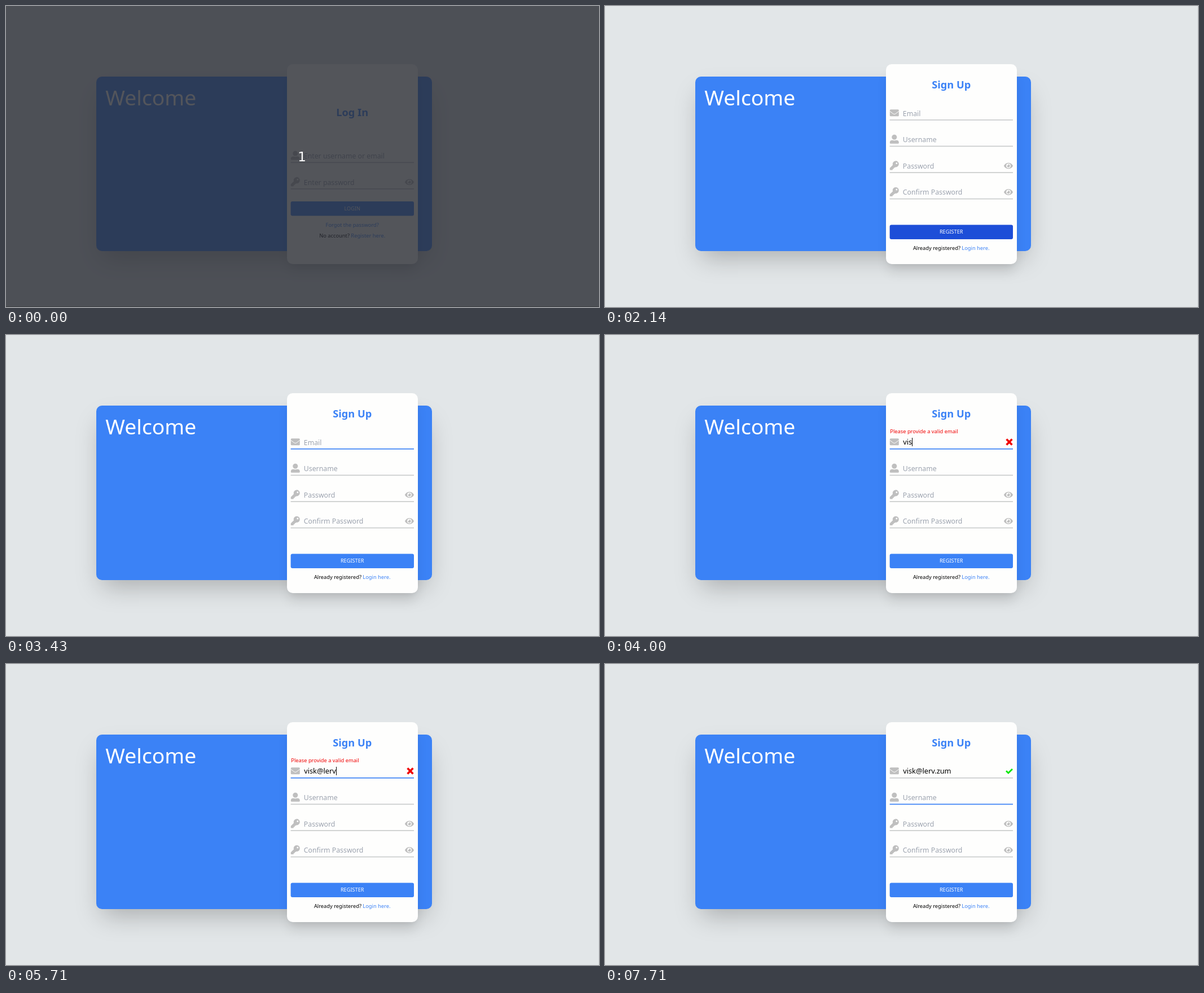
An HTML page that plays this animation: 1051x533 px, repeating every 8 s.

```html
<!DOCTYPE html>
<html lang="en">
<head>
<meta charset="utf-8">
<title>Welcome</title>
<style>
  html, body { margin: 0; width: 100%; height: 100%; overflow: hidden; }
  body { position: relative; background: #e2e6e8; }
  .panel, .card, svg { position: absolute; }
  .panel {
    left: 160px; top: 125.4px; width: 595px; height: 308.6px;
    border-radius: 10px; background: #3b82f6;
    box-shadow: 0 21px 42px -10px rgba(0, 0, 0, .25);
  }
  .card {
    left: 498.2px; top: 103px; width: 231.4px; height: 354px;
    border-radius: 10px; background: #fefefd;
    box-shadow: 0 17px 21px -4px rgba(0, 0, 0, .1), 0 8px 8px -4px rgba(0, 0, 0, .04);
  }
  svg { left: 0; top: 0; }
  text { font-family: "Noto Sans", "Open Sans", sans-serif; white-space: pre; }
  .welcome { font-size: 37.3px; fill: #fff; }
  .title { font-size: 18.2px; font-weight: 700; }
  .title, .small, .label { text-anchor: middle; }
  .title, .link { fill: #3b82f6; }
  .small, .error { font-size: 9.3px; }
  .label { font-size: 9.2px; fill: #fff; }
  .hint { font-size: 12.3px; fill: #9ca3af; }
  .value { font-size: 12.8px; fill: #000; }
  .error { fill: #f00000; }
  .icon { fill: #bfbfbf; fill-rule: evenodd; }
  .line { fill: #cacccd; }
  .line.focus, .button { fill: #3b82f6; }
  .button.hover { fill: #1d4ed8; }
  .mark { fill: none; }
  .count { font: 23px "DejaVu Sans", sans-serif; fill: #fff; text-anchor: middle; }
</style>
</head>
<body>
<div class="panel"></div>
<div class="card"></div>
<svg width="1051" height="533" viewBox="0 0 1051 533">
  <defs>
    <g id="user">
      <circle cx="8" cy="4.5" r="4.5"/>
      <path d="M12 10h-1.7a5.4 5.4 0 0 1-4.6 0H4a4 4 0 0 0-4 4v.5A1.5 1.5 0 0 0 1.5 16h13a1.5 1.5 0 0 0 1.5-1.5V14a4 4 0 0 0-4-4z"/>
    </g>
    <g id="mail">
      <rect y="2" width="16" height="12" rx="1.5"/>
      <path d="M0 5.2L6 9.7Q8 11.2 10 9.7L16 5.2" fill="none" stroke="#fefefd"/>
    </g>
    <path id="key" d="M16 5.5A5.5 5.5 0 0 1 9.5 10.9L8.7 11.75A.75.75 0 0 1 8.2 12H7v1.25a.75.75 0 0 1-.75.75H5v1.25a.75.75 0 0 1-.75.75H.75A.75.75 0 0 1 0 15.25v-2.4q0-.35.2-.55l5.1-5.1A5.5 5.5 0 1 1 16 5.5zM10.5 4a1.5 1.5 0 1 0 3 0 1.5 1.5 0 1 0-3 0z"/>
    <path id="eye" d="M.1-.4C1.6-3.3 4.6-5.3 8-5.3s6.4 2 7.9 4.9a.9.9 0 0 1 0 .8C14.4 3.3 11.4 5.3 8 5.3S1.6 3.3 .1 .4a.9.9 0 0 1 0-.8zM8 4a4 4 0 1 0 0-8 4 4 0 0 0 0 8zM7.3-2.55a1.33 1.33 0 0 1-1.86 1.86A2.66 2.66 0 1 0 7.3-2.55z"/>
  </defs>
  <rect x="1050" width="1" height="533" fill="#d9dddf"/>
  <text class="welcome" x="176.3" y="176">Welcome</text>

  <g id="login">
    <text class="title" x="613.7" y="195">Log In</text>
    <g class="rows"></g>
    <rect class="button" x="504.6" y="346" width="218.4" height="25.4" rx="3"/>
    <text class="label" x="613.7" y="361.5">LOGIN</text>
    <text class="small link" x="613.7" y="390.6">Forgot the password?</text>
    <text class="small" x="613.7" y="410">No account? <tspan class="link">Register here.</tspan></text>
  </g>

  <g id="signup">
    <text class="title" x="613.7" y="146.3">Sign Up</text>
    <g class="rows"></g>
    <rect id="register" class="button" x="504.6" y="387.6" width="218.4" height="25.4" rx="3"/>
    <text class="label" x="613.7" y="403.3">REGISTER</text>
    <text class="small" x="613.7" y="432.4">Already registered? <tspan class="link">Login here.</tspan></text>
    <text id="error" class="error" x="505.3" y="174">Please provide a valid email</text>
    <text id="value" class="value" x="528.2" y="194.4"></text>
    <path id="cross" class="mark" stroke="#f00000" stroke-width="3.6" d="M711.6 184.6l9.8 9.8M721.4 184.6l-9.8 9.8"/>
    <path id="check" class="mark" stroke="#0ce80c" stroke-width="2.8" d="M711 189.2l3.9 3.9 7.1-7.1"/>
    <rect id="caret" width="1" height="15"/>
  </g>

  <g id="cover">
    <rect width="1051" height="533" fill="rgba(40,43,50,.8)"/>
    <rect y="532" width="1051" height="1" fill="#3c3f42"/>
    <text class="count" x="524.6" y="275">1</text>
  </g>
</svg>
<script>
const $ = id => document.getElementById(id);
const LOOP = 8000;
const ADDRESS = 'visk@lerv.zum';

const row = (y, icon, hint, eye) => `
  <use class="icon" href="#${icon}" x="504.8" y="${y - 20.6}"/>
  <text class="hint" x="527.8" y="${y - 7.2}">${hint}</text>
  ${eye ? `<use class="icon" href="#eye" x="707" y="${y - 12}"/>` : ''}
  <rect class="line" x="504.6" y="${y - .9}" width="218.4" height="1.7"/>`;

const fill = (id, first, rows) => {
  document.querySelector(`#${id} .rows`).innerHTML =
    rows.map((r, i) => row(first + i * 46.6, ...r)).join('');
};
fill('login', 277.2, [
  ['user', 'Enter username or email'],
  ['key', 'Enter password', true]
]);
fill('signup', 201.8, [
  ['mail', 'Email'],
  ['user', 'Username'],
  ['key', 'Password', true],
  ['key', 'Confirm Password', true]
]);

const lines = document.querySelectorAll('#signup .line');
const emailHint = document.querySelector('#signup .hint');

// [time, characters typed]
const typing = [[3860, 2], [4000, 3], [4290, 4], [4570, 5], [5430, 7],
  [5570, 8], [5710, 9], [6430, 10], [6570, 12], [6710, 13]];
const caretOn = [[3000, 3430], [3860, 5140], [5430, 6290], [6430, 7570]];

const show = (el, on) => { el.style.display = on ? '' : 'none'; };

function render(t) {
  const within = (a, b = LOOP) => t >= a && t < b;
  show($('cover'), within(0, 140));
  show($('login'), within(0, 2140));
  show($('signup'), within(2140));
  $('register').classList.toggle('hover', within(2140, 2570));
  lines[0].classList.toggle('focus', within(3000, 7000));
  lines[1].classList.toggle('focus', within(7000));

  const count = typing.reduce((n, [at, c]) => t >= at ? c : n, 0);
  const value = $('value');
  value.textContent = ADDRESS.slice(0, count);
  show(emailHint, !count);
  show($('error'), within(3860, 7000));
  show($('cross'), within(3860, 7710));
  show($('check'), within(7710));

  const onEmail = t < 7000;
  const x = onEmail && count ? 528.2 + value.getComputedTextLength() : 529;
  $('caret').setAttribute('x', Math.round(x));
  $('caret').setAttribute('y', onEmail ? 182 : 229);
  show($('caret'), caretOn.some(([a, b]) => within(a, b)));
}

const start = performance.now();
function tick() {
  render((performance.now() - start) % LOOP);
  requestAnimationFrame(tick);
}
tick();
</script>
</body>
</html>
```
